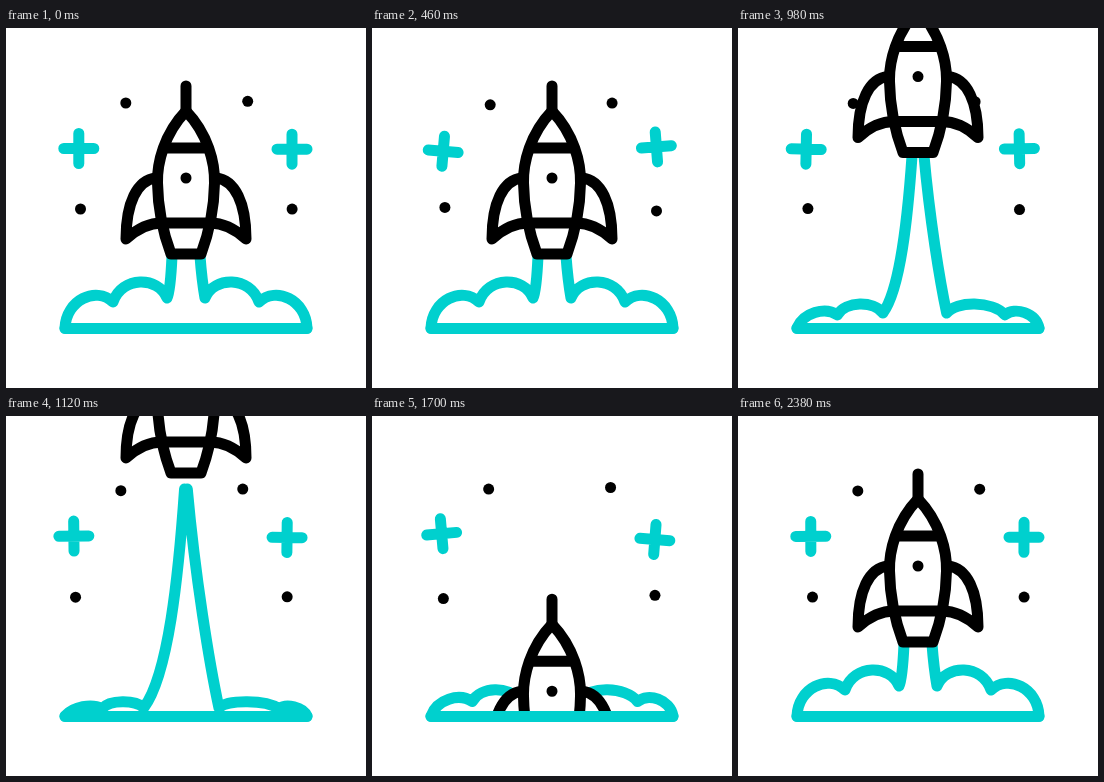
Write an HTML page that moves like this. It is 360x360 px and loops after 2400 ms.

```html
<!DOCTYPE html>
<html>
<head>
<meta charset="utf-8">
<style>
  html, body { margin: 0; height: 100%; overflow: hidden; background: #fff; }
  svg { display: block; width: 100%; height: 100%; fill: none; stroke-width: 11; stroke-linecap: round; stroke-linejoin: round; }
  .teal { stroke: #00d0ce; }
  .black { stroke: #000; }
</style>
</head>
<body>
<svg viewBox="0 0 360 360">
  <defs><clipPath id="ground"><path d="M0 0H360V300H0Z"/></clipPath></defs>
  <g id="sky"></g>
  <path id="smoke" class="teal"/>
  <g clip-path="url(#ground)">
    <g id="rocket" class="black">
      <path fill="#fff" d="M150 150C131 152 120 175 120 211C132 200 145 195 156 195H204C215 195 228 200 240 211C240 175 229 152 210 150"/>
      <path fill="#fff" d="M180 83C158 106 151 135 151.500 155C152 185 159 210 165 226H195C201 210 208 185 208.500 155C209 135 202 106 180 83Z"/>
      <path d="M180 58V83M162 120H198M157 195H203M180 150h.01"/>
    </g>
  </g>
  <path class="teal" d="M59 300.500H301"/>
</svg>
<script>
const LOOP = 2400;
const $ = id => document.getElementById(id);
const mix = (a, b, u) => a + (b - a) * u;
const ease = (t, from, to) => {
  const u = Math.min(1, Math.max(0, (t - from) / (to - from)));
  return (1 - Math.cos(Math.PI * u)) / 2;
};

// Centre of drift, vertical amplitude, spin (0 draws a dot)
const floaters = [
  [70.3, 120.5, 2.8, 5], [283.5, 121.2, -2.3, -4.5],
  [117.3, 75, 1.9, 0], [239.2, 73.3, 1.8, 0],
  [72, 181, -1.6, 0], [283.6, 181.1, 1.8, 0]
].map(([x, y, sway, spin]) => {
  const el = document.createElementNS('http://www.w3.org/2000/svg', 'path');
  el.setAttribute('d', spin ? 'M-15 0H15M0 -15V15' : 'M0 0h.01');
  el.setAttribute('class', spin ? 'teal' : 'black');
  $('sky').append(el);
  return { el, x, y, sway, spin };
});

// Cloud curves, puffed up and flattened
const leftFull = [59, 300, 60, 272, 90, 258, 107, 274, 116, 248, 152, 248, 161, 270];
const leftFlat = [59, 300, 70, 296, 84, 296, 93, 298, 100, 294, 122, 294, 131, 298];
const rightFull = [199, 270, 208, 248, 244, 248, 253, 274, 270, 258, 300, 272, 301, 300];
const rightFlat = [217, 298, 226, 294, 264, 294, 279, 298, 283, 296, 296, 296, 301, 300];
const morph = (flat, full, u) => flat.map((v, i) => mix(v, full[i], u));
const curve = p => `M${p.slice(0, 2)}C${p.slice(2)}`;

function rocketOffset(t) {
  if (t < 500) return 0;
  if (t < 1240) return -101 * ((t - 500) / 480) ** 2;
  return 260 * (1 - ease(t, 1152, 2225));
}

function flameSide(fx, fy, tx, ty, [x1, y1, x2, y2]) {
  const x = u => mix(fx, tx, u), y = u => mix(fy, ty, u);
  return curve([fx, fy, x(x1), y(y1), x(x2), y(y2), tx, ty]);
}

function flame(t, left, right) {
  const collapse = ease(t, 1100, 1400);
  const launching = t < 1400;
  const offset = rocketOffset(launching ? Math.min(t, 1100) : t);
  const y = launching ? mix(228 + offset, 300, collapse) : 228 + offset;
  const [lx, ly] = left.slice(-2), [rx, ry] = right;
  if (y > ly) return '';
  const half = Math.max(0, 14 + Math.min(0, offset) * .08) * (launching ? 1 - collapse : 1);
  const mid = launching ? 180 - 6 * collapse : 180;
  return flameSide(lx, ly, mid - half, y, [.6, .15, .85, .6]) +
         flameSide(rx, ry, mid + half, y, [.3, .2, .75, .6]);
}

function draw(now) {
  const t = now % LOOP;
  const phase = 2 * Math.PI * t / LOOP;
  const swing = Math.sin(phase + .35 * Math.sin(phase / 2));
  for (const { el, x, y, sway, spin } of floaters) {
    el.setAttribute('transform',
      `translate(${x + 2.5 * Math.cos(phase)} ${y + sway * swing}) rotate(${spin * swing})`);
  }

  const puff = 1 - ease(t, 520, 1400) + ease(t, 1400, 1990);
  const left = morph(leftFlat, leftFull, puff);
  const right = morph(rightFlat, rightFull, puff);
  $('smoke').setAttribute('d', curve(left) + curve(right) + flame(t, left, right));
  $('rocket').setAttribute('transform', `translate(0 ${rocketOffset(t)})`);
}

const start = performance.now();
(function tick() {
  draw(performance.now() - start);
  requestAnimationFrame(tick);
})();
</script>
</body>
</html>
```
